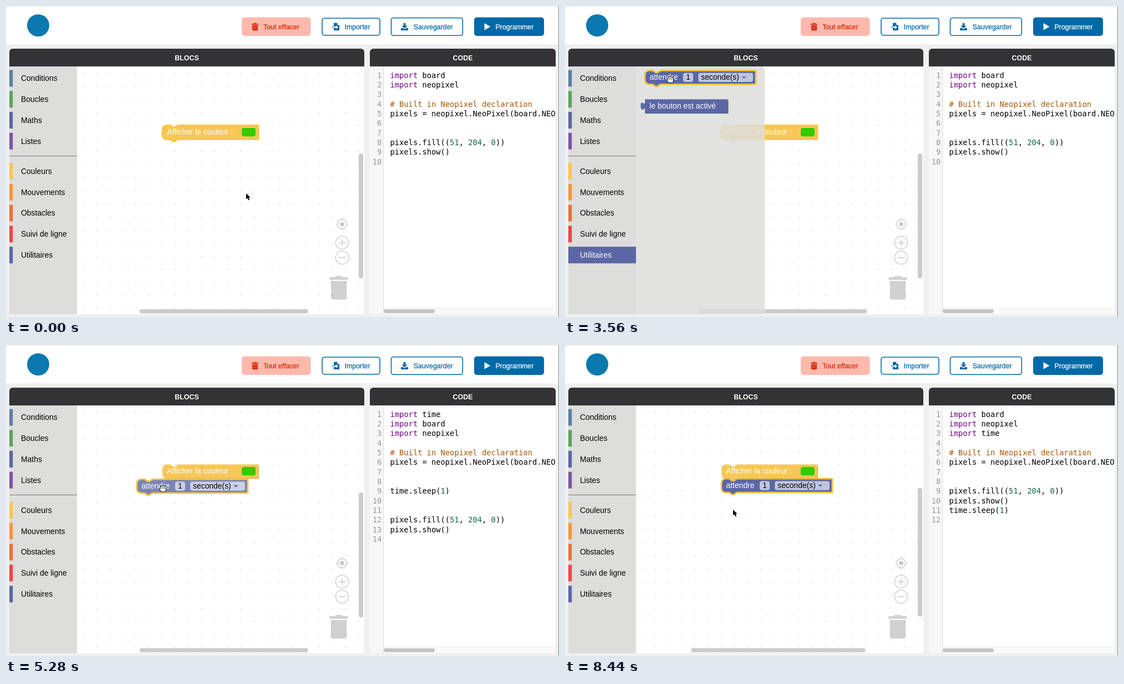
Animation, 997 px wide and 561 px high, one loop 8.96 s. Source, as an HTML page with a canvas:

```html
<!DOCTYPE html>
<html lang="fr">
<head>
<meta charset="utf-8">
<title>Éditeur de blocs</title>
<style>
html, body { margin: 0; width: 100%; height: 100%; overflow: hidden; background: #f0f0f0; }
canvas { display: block; }
</style>
</head>
<body>
<canvas id="stage" width="997" height="561"></canvas>
<script>
const g = document.getElementById('stage').getContext('2d');
const LOOP = 8960, STEP = 40;
const SANS = '"Liberation Sans", Arial, sans-serif';
const MONO = '"DejaVu Sans Mono", Menlo, monospace';
const BLUE = '#0069a7', VIOLET = '#5b67a5', YELLOW = '#f6c757', GLOW = '#fbc53c';

// Moments of the interaction, in ms
const OPEN = 1560, PRESS = 3480, DRAG = 4200, NEAR = 5480, DROP = 6240;

const mousePath = [
  [480, 433, 338], [1400, 84, 450], [2400, 84, 450], [3400, 190, 133], [4160, 190, 133],
  [4440, 203.5, 177], [4880, 240.5, 235], [5300, 285, 260], [5640, 319, 266],
  [6800, 319, 266], [7600, 303, 297], [8440, 303, 297]
];
const blockPath = [
  [4160, 144, 116.3], [4440, 154, 150.7], [4880, 191, 213.8], [5300, 238, 243], [5640, 272.7, 249.2]
];

const categories = [
  ['Conditions', 130.5, '#5b80a5'], ['Boucles', 168.3, '#5ba55b'], ['Maths', 206, VIOLET],
  ['Listes', 243.8, '#7a57a5'], ['Couleurs', 298, '#f9c74f'], ['Mouvements', 335.8, '#f8963a'],
  ['Obstacles', 373.6, '#ee7038'], ['Suivi de ligne', 411.4, '#f5434a'], ['Utilitaires', 449.2, VIOLET]
];

const setup = ['', '# Built in Neopixel declaration', 'pixels = neopixel.NeoPixel(board.NEOPIXEL, 1)', '', ''];
const paint = ['pixels.fill((51, 204, 0))', 'pixels.show()'];
const wait = 'time.sleep(1)';
const imports = names => names.map(n => 'import ' + n);
const programs = [
  [...imports(['board', 'neopixel']), ...setup, ...paint, ''],
  [...imports(['time', 'board', 'neopixel']), ...setup, wait, '', '', ...paint, ''],
  [...imports(['board', 'neopixel', 'time']), ...setup, ...paint, wait, '']
];

// Smooth curve through timed points, at rest on flat stretches
function along(keys, t) {
  const last = keys.length - 1;
  if (t <= keys[0][0]) return keys[0].slice(1);
  if (t >= keys[last][0]) return keys[last].slice(1);
  const i = keys.findIndex(k => k[0] > t) - 1;
  const still = (a, b) => keys[a][1] === keys[b][1] && keys[a][2] === keys[b][2];
  const slope = (k, c) => k === 0 || k === last || still(k - 1, k) || still(k, k + 1) ? 0
    : (keys[k + 1][c] - keys[k - 1][c]) / (keys[k + 1][0] - keys[k - 1][0]);
  const a = keys[i], b = keys[i + 1], d = b[0] - a[0], u = (t - a[0]) / d, v = 1 - u;
  return [1, 2].map(c => a[c] * v * v * (1 + 2 * u) + b[c] * u * u * (3 - 2 * u)
    + d * u * v * (slope(i, c) * v - slope(i + 1, c) * u));
}

function rect(x, y, w, h, color) {
  g.fillStyle = color;
  g.fillRect(x, y, w, h);
}

function round(x, y, w, h, r, color, line) {
  g.beginPath();
  g.roundRect(x, y, w, h, r);
  if (color) { g.fillStyle = color; g.fill(); }
  if (line) { g.strokeStyle = line; g.stroke(); }
}

function text(s, x, y, color, font, align = 'left') {
  g.font = font;
  g.textAlign = align;
  g.fillStyle = color;
  g.fillText(s, x, y);
}

function poly(points, color, close = true) {
  g.beginPath();
  points.forEach(([x, y]) => g.lineTo(x, y));
  if (close) g.closePath();
  if (color) { g.fillStyle = color; g.fill(); }
}

function circle(x, y, r, color) {
  g.beginPath();
  g.arc(x, y, r, 0, 7);
  if (color) { g.fillStyle = color; g.fill(); } else g.stroke();
}

function label(s, x, color) {
  text(s, x, 41.5, color, '12.4px ' + SANS);
  g.strokeStyle = color;
  g.lineWidth = 0.25;
  g.strokeText(s, x, 41.5);
}

function topBar() {
  rect(0, 0, 997, 69, '#fff');
  rect(0, 0, 997, 1, '#e6e6e6');
  circle(58, 35, 20, '#0b78b0');

  round(425, 20.5, 124.5, 33.5, 5, '#feb9ac');
  const red = '#d62a0c';
  label('Tout effacer', 464, red);
  rect(443, 32, 12, 1.8, red);
  rect(446.5, 30.8, 5, 1.5, red);
  round(444, 34.7, 10, 9.5, [0, 0, 1.5, 1.5], red);
  for (const x of [446.3, 448.6, 450.9]) rect(x, 36.3, 0.7, 6, '#f0806c');

  g.lineWidth = 1.6;
  round(570, 22, 104, 30.8, 4, '#fff', BLUE);
  label('Importer', 610.5, BLUE);
  poly([[591, 30.5], [597, 30.5], [601, 34.5], [601, 44], [591, 44]], BLUE);
  poly([[597.4, 30.5], [597.4, 34.2], [601, 34.2]], '#fff');
  rect(591, 37, 5, 2.4, '#fff');
  poly([[595, 35], [599, 38.2], [595, 41.4]], '#fff');
  rect(588, 37.5, 3, 1.4, BLUE);

  g.lineWidth = 1.6;
  round(694.5, 21.5, 128.8, 31.8, 4, '#fff', BLUE);
  label('Sauvegarder', 734.8, BLUE);
  rect(716.6, 30.8, 3.8, 5, BLUE);
  poly([[713.4, 35.5], [723.6, 35.5], [718.5, 40.6]], BLUE);
  poly([[712, 39.8], [715.8, 39.8], [718.5, 42], [721.2, 39.8], [725, 39.8], [725, 44], [712, 44]], BLUE);

  round(844, 20.5, 126, 33.5, 5, BLUE);
  label('Programmer', 882.5, '#fff');
  poly([[862.5, 31], [873.5, 37.3], [862.5, 43.6]], '#fff');
}

function toolbox(open) {
  rect(6, 109, 122, 447, '#dddddb');
  for (const [name, y, color] of categories) {
    const on = open && name === 'Utilitaires';
    rect(6, y - 15, on ? 122 : 6.3, 30, color);
    text(name, 27, y + 4.8, on ? '#fff' : '#000', '13.9px ' + SANS);
  }
  rect(6, 270, 122, 1, '#777');
}

function workspace(dropped) {
  rect(128, 109, 518, 447, '#fff');
  for (let i = 0; i < 22; i++)
    for (let j = 0; j < 19; j++) rect(139 + i * 23.6, 120.3 + j * 23.6, 1.6, 1.4, '#cfcfcf');

  g.strokeStyle = '#cdcdcd';
  g.lineWidth = 1.5;
  circle(606, 393.5, 8.3);
  for (const [x, y] of [[0, -1], [1, 0], [0, 1], [-1, 0]]) {
    g.beginPath();
    g.moveTo(606 + x * 8, 393.5 + y * 8);
    g.lineTo(606 + x * 11, 393.5 + y * 11);
    g.stroke();
  }
  circle(606, 393.5, 3.8, '#c8c8c8');
  for (const y of [427, 454]) {
    circle(606, y, 11.7);
    rect(600, y - 0.8, 12, 1.6, '#cdcdcd');
  }
  rect(605.2, 421, 1.6, 12, '#cdcdcd');

  const bin = 'rgba(0,0,0,.18)';
  rect(583.5, 489, 33, 5, bin);
  rect(594, 487, 12, 2, bin);
  round(585.8, 496, 28.4, 33.5, [0, 0, 3, 3], bin);

  if (dropped) {
    round(227.5, 547, 314, 7.5, 3.7, '#cbcbcb');
    round(636, 258, 8, 232, 4, '#cbcbcb');
  } else {
    round(240.5, 547, 304, 7.5, 3.7, '#cbcbcb');
    round(636, 266, 8, 225.5, 4, '#cbcbcb');
  }
}

function outline(x, y, w, tab) {
  const p = new Path2D(), b = y + 25;
  if (tab) {
    p.moveTo(x, y);
    p.lineTo(x + w, y);
    p.lineTo(x + w, b);
    p.lineTo(x, b);
    p.lineTo(x, y + 18.9);
    p.bezierCurveTo(x, y + 9.5, x - 7.5, y + 26.4, x - 7.5, y + 11.8);
    p.bezierCurveTo(x - 7.5, y - 2.4, x, y + 14.2, x, y + 4.7);
  } else {
    const r = 7.5;
    p.moveTo(x, y + r);
    p.arcTo(x, y, x + r, y, r);
    for (const [dx, dy] of [[14.2, 0], [19.8, 3.8], [22.7, 3.8], [28.3, 0], [w, 0],
      [w, 25], [27.9, 25], [22.2, 28.8], [19.4, 28.8], [13.7, 25]]) p.lineTo(x + dx, y + dy);
    p.lineTo(x + r, b);
    p.arcTo(x, b, x, b - r, r);
  }
  p.closePath();
  return p;
}

function body(x, y, w, [color, light, dark], { selected, alpha = 1, tab } = {}) {
  const shape = outline(x, y, w, tab);
  g.save();
  g.globalAlpha = alpha;
  g.fillStyle = dark;
  if (!selected) g.fill(outline(x + 0.9, y + 0.9, w, tab));
  g.fillStyle = color;
  g.fill(shape);
  g.globalAlpha = 1;
  if (selected) {
    g.lineWidth = 2.8;
    g.lineJoin = 'round';
    g.strokeStyle = GLOW;
    g.stroke(shape);
  } else {
    // Light only along the top and left edges
    g.clip(shape);
    g.beginPath();
    g.rect(x - 9, y - 1, w + 9, 6);
    g.rect(x - 9, y, 14, 20);
    g.clip();
    g.lineWidth = 1.6;
    g.strokeStyle = light;
    g.stroke(shape);
  }
  g.restore();
}

const violetSet = [VIOLET, '#8c95c0', '#495284'];
const yellowSet = [YELLOW, '#f9d889', '#c9a146'];
const blockFont = '13.9px ' + SANS;

function colorBlock(selected) {
  const x = 282, y = 215.4;
  body(x, y, 173, yellowSet, { selected });
  text('Afficher la couleur :', x + 8.3, y + 16.8, '#fff', blockFont);
  round(x + 143, y + 4.6, 25, 15.2, 4, '#33cc00');
}

function waitBlock(x, y, state) {
  body(x, y, 200, violetSet, state);
  text('attendre', x + 8.5, y + 16.8, '#fff', blockFont);
  const field = 'rgba(255,255,255,.62)';
  round(x + 69, y + 4.4, 18, 16.2, 3.8, field);
  round(x + 96.3, y + 4.4, 98.7, 16.2, 3.8, field);
  text('1', x + 78, y + 16.8, '#000', blockFont, 'center');
  text('seconde(s)', x + 101.2, y + 16.8, '#000', blockFont);
  poly([[x + 174.5, y + 10.6], [x + 182.5, y + 10.6], [x + 178.5, y + 14.8]], VIOLET);
}

function flyout(pressed) {
  round(128, 109, 232, 447, [0, 7, 7, 0], 'rgba(221,221,219,.85)');
  waitBlock(144, 116.3, { selected: pressed });
  body(144, 168.2, 149.5, violetSet, { tab: true });
  text('le bouton est activé', 152.3, 185, '#fff', blockFont);
}

function codeLine(s, x, y) {
  const font = '13.75px ' + MONO;
  if (s[0] === '#') return text(s, x, y, '#aa5500', font);
  for (const part of s.split(/(\bimport\b|\b\d+\b)/)) {
    text(part, x, y, part === 'import' ? '#770088' : /^\d+$/.test(part) ? '#116644' : '#000', font);
    x += g.measureText(part).width;
  }
}

function codePanel(lines) {
  rect(656, 109, 335, 447, '#fff');
  rect(656, 109, 24, 447, '#f7f7f7');
  rect(680, 109, 1, 447, '#dcdcdc');
  rect(681, 545, 310, 11, '#fafafa');
  rect(681, 544.5, 310, 1, '#e8e8e8');
  round(681, 547.3, 92, 6.6, 3.3, '#c2c2c2');
  g.save();
  g.beginPath();
  g.rect(656, 109, 335, 435);
  g.clip();
  lines.forEach((s, i) => {
    const y = 129.8 + i * 17.32;
    text(i + 1, 677.3, y, '#999', '13.75px ' + MONO, 'right');
    codeLine(s, 692.5, y);
  });
  g.restore();
}

function title(s, x, w) {
  round(x, 77, w, 32, [6, 6, 0, 0], '#333335');
  text(s, x + w / 2, 97.5, '#fff', 'bold 12.4px ' + SANS, 'center');
}

function arrow(x, y) {
  poly([[x, y], [x, y + 10.6], [x + 2.4, y + 8.4], [x + 4.3, y + 12.4], [x + 6.2, y + 11.5],
    [x + 4.4, y + 7.7], [x + 7.5, y + 7.5]]);
  g.lineJoin = 'round';
  g.lineWidth = 1.8;
  g.strokeStyle = '#fff';
  g.stroke();
  g.fillStyle = '#000';
  g.fill();
}

function hand(x, y, closed) {
  const top = closed ? y - 3.5 : y - 5.5;
  g.lineWidth = 1.8;
  g.lineJoin = 'round';
  const parts = new Path2D();
  [0.8, 0, 0.3, 1.2].forEach((drop, i) => parts.roundRect(x - 3.6 + i * 2.1, top + drop, 2.2, 6, 1.1));
  parts.roundRect(x - 4, y - 1, 8.8, 6, 2.5);
  parts.roundRect(x - 5.4, y - (closed ? 1 : 0.5), 3, 3.8, 1.4);
  g.strokeStyle = '#000';
  g.stroke(parts);
  g.fillStyle = '#fff';
  g.fill(parts);
  g.lineWidth = 0.6;
  for (const dx of [-1.4, 0.7, 2.8]) {
    g.beginPath();
    g.moveTo(x + dx, top + 1.5);
    g.lineTo(x + dx, y + (closed ? 0 : 0.5));
    g.stroke();
  }
}

function draw(t) {
  const open = t >= OPEN && t < DRAG, dragging = t >= DRAG && t < DROP, dropped = t >= DROP;
  rect(0, 0, 997, 561, '#f0f0ef');
  topBar();
  workspace(dropped);
  if (dragging && t >= NEAR) {
    g.fillStyle = 'rgba(0,0,0,.38)';
    g.fill(outline(282, 241.2, 200));
  }
  if (dropped) waitBlock(282, 241.2, { selected: true });
  colorBlock(t < DRAG);
  if (dragging) waitBlock(...along(blockPath, t), { selected: true, alpha: 0.8 });
  toolbox(open);
  if (open) flyout(t >= PRESS);
  codePanel(programs[dropped ? 2 : dragging ? 1 : 0]);
  title('BLOCS', 6, 640);
  title('CODE', 656, 335);
  rect(996, 0, 1, 561, '#858585');

  const [x, y] = along(mousePath, t);
  if (t >= 3320 && t < 7080) hand(x, y, t >= DRAG && t < 4640);
  else arrow(x, y);
}

function frame(now) {
  draw(Math.floor((now % LOOP) / STEP) * STEP);
  requestAnimationFrame(frame);
}
draw(0);
requestAnimationFrame(frame);
</script>
</body>
</html>
```
